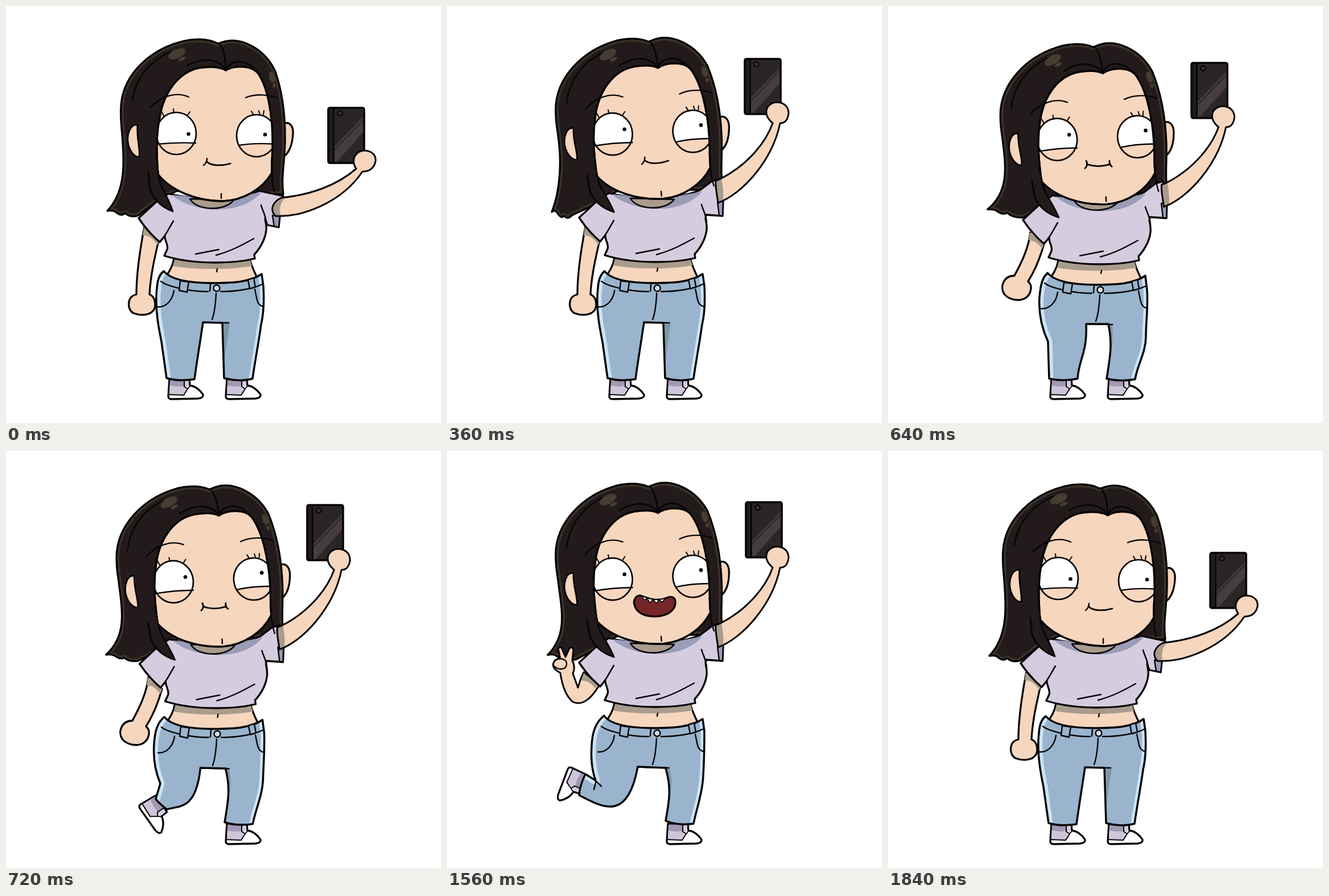
Animation, 764 px wide and 733 px high, one loop 2.4 s. Source, as an HTML page:

```html
<!DOCTYPE html>
<html lang="en">
<head>
<meta charset="utf-8">
<title>Selfie</title>
<style>
  html, body { margin: 0; width: 100%; height: 100%; overflow: hidden; background: #fff; }
  svg { display: block; width: 100%; height: 100%; }
</style>
</head>
<body>
<svg id="stage" viewBox="0 0 764 733" stroke-linecap="round" stroke-linejoin="round"></svg>
<script>
const LOOP = 2400;
const INK = '#060405', SKIN = '#f7d6be', SHADE = '#a99c8c', HAIR = '#221a1b', RIM = '#3a3328', GLOSS = '#453d31';
const SHIRT = '#d5cddf', SHIRT_DARK = '#9a9cb8', JEANS = '#9ab4cd', JEANS_LIGHT = '#cbe3f5', JEANS_DARK = '#7c99a8';

// ---- poses ----
const down = {
  head: [0, 0, 0], gaze: 0, torso: [0, 0], waist: [0, 0], mouth: 'smile', peace: false,
  tail: 'C208,270 212,325 178,360 Q190,358 195,364 Q203,370 209,364 Q219,373 233,368',
  armPos: [0, 0], phone: [0, 0],
  arm: 'M484,337 C535,332 582,315 615,286 C604,268 616,254 630,254 C645,255 650,264 649,273 C646,287 637,291 626,291 C590,345 520,372 473,369 C463,358 468,344 484,337',
  cuff: 'M473,369 C463,358 468,344 484,337 L491,336 C481,345 479,360 483,369',
  sleeve: 'L459,385 L479,389 L481,370 L487,334 L468,330',
  sleeveShade: 'M468,368 L471,387 L479,389 L481,368Z',
  left: 'M243,388 C235,430 229,470 229,507 C212,510 212,534 224,540 C240,546 262,543 262,525 C262,512 255,508 252,507 C254,470 262,440 268,412',
  leftShade: 'M242,389 L268,414 L266,420 C258,408 250,403 240,403',
  legs: [
    'M277,466 C266,474 265,490 264,510 C263,540 268,565 273,590 L282,654',
    'C298,659 318,658 331,656 C336,620 341,590 346,556 L380,557 C381,590 382,620 383,654 C400,659 420,659 433,655',
    'M433,655 C438,620 444,590 448,560 C453,540 453,510 452,492 L449,471'],
  inner: 'M380,557 L393,557 C390,580 387,600 383,625',
  shoe: [305, 657, 0]
};
const up = {
  ...down, head: [-1.5, -4, -3.6], gaze: -8, torso: [-1, -1], waist: [-.7, 0],
  tail: 'C208,270 200,320 184,354 Q190,349 194,357 Q200,368 205,362 Q211,370 219,362',
  phone: [-43, -86],
  arm: 'M480,304 C522,283 558,245 572,206 C553,190 560,170 580,169 C595,170 600,180 600,189 C598,202 593,206 585,206 C572,270 520,330 476,346 C474,330 471,318 472,307',
  cuff: 'M476,346 C474,330 471,318 472,307 L482,303 C485,318 486,332 485,341',
  sleeve: 'L456,368 L485,370 L486,346 L479,305 L466,309',
  sleeveShade: 'M476,344 L479,369 L485,370 L486,341Z'
};
const crouch = {
  ...up, head: [5, 5.5, -3.6], torso: [4, 3], waist: [3, 3], mouth: 'flat',
  tail: 'C206,265 210,310 169,339 Q182,339 188,345 Q196,351 203,347 Q212,357 230,357',
  armPos: [8.5, 7], phone: [-33, -79],
  left: 'M250,398 C247,425 235,450 222,474 C203,474 196,494 204,506 C214,520 244,522 250,502 C253,492 250,488 246,484 C258,465 268,440 274,418',
  leftShade: 'M249,398 L274,418 L271,427 C263,416 256,412 247,412',
  legs: [
    'M280,470 C271,477 268,490 266,512 C264,542 271,568 281,590 L283,655',
    'C300,659 320,658 333,655 C335,620 350,612 348,559 L387,559 C394,592 391,612 384,655 C400,659 420,659 434,656',
    'M434,656 C438,630 453,610 453,580 C453,555 457,530 455,500 L452,474'],
  inner: 'M386,559 L393,560 C397,580 393,602 389,622'
};
const overshoot = {
  ...up, waist: [-1, 0], mouth: 'open', peace: true,
  tail: 'C206,270 216,315 177,350 Q188,348 194,354 Q200,358 206,357 Q214,363 226,361',
  armPos: [0, -1], phone: [-41, -89], left: crouch.left, leftShade: crouch.leftShade,
  legs: [
    'M276,465 C261,477 255,494 254,519 C252,547 256,565 261,579 L243,568',
    'C237,580 233,592 232,605 C273,626 317,653 335,555 L384,557 C394,592 391,612 384,650 C400,657 420,657 433,655',
    'M433,655 C438,630 449,600 450,570 C452,540 452,510 452,492 L449,471'],
  inner: 'M384,557 L391,557 C397,580 394,600 389,622',
  shoe: [238, 586, 112]
};
const cheer = {
  ...overshoot, head: [.5, -2, -3.6], torso: [0, 0], waist: [0, 0], armPos: [3, 1], phone: [-38, -87],
  legs: [
    'M277,466 C264,478 258,495 257,520 C255,548 258,566 263,581 L246,570',
    'C240,582 236,594 235,607 C275,628 320,655 338,555 L384,557 C394,592 391,612 384,650 C400,657 420,657 433,655',
    overshoot.legs[2]],
  shoe: [241, 588, 112]
};

const NUM = /-?\d+(\.\d+)?/g;
function mix(a, b, t) {
  if (typeof a === 'number') return a + (b - a) * t;
  if (typeof a === 'string') {
    const other = b.match(NUM) || [];
    let i = 0;
    return a.replace(NUM, n => mix(+n, +other[i++], t).toFixed(1));
  }
  if (Array.isArray(a)) return a.map((v, i) => mix(v, b[i], t));
  if (typeof a === 'object') return Object.fromEntries(Object.keys(a).map(k => [k, mix(a[k], b[k], t)]));
  return a;
}

const timeline = [
  [0, down],
  [240, { ...mix(down, crouch, .5), legs: crouch.legs, inner: crouch.inner, tail: crouch.tail }],
  [320, mix(down, up, .7)],
  [360, up],
  [440, { ...up, head: cheer.head, torso: [0, 0], waist: [0, 0], armPos: cheer.armPos, phone: cheer.phone }],
  [640, crouch],
  [720, mix(crouch, overshoot, .5)],
  [800, overshoot],
  [880, cheer],
  [1560, overshoot],
  [1640, mix(crouch, overshoot, .5)],
  [1680, crouch],
  [1760, { ...down, head: [2, 3, 0], torso: [1, 1], armPos: [5, 3], phone: [5, 4] }],
  [1840, down]
];

// ---- drawing helpers ----
const shape = (d, fill, w = 3.3) => `<path d="${d}" fill="${fill}" stroke="${INK}" stroke-width="${w}"/>`;
const flat = (d, fill) => `<path d="${d}" fill="${fill}"/>`;
const line = (d, w = 2.4, color = INK) => `<path d="${d}" fill="none" stroke="${color}" stroke-width="${w}"/>`;
const oval = (x, y, rx, ry, fill, w = 0, turn = 0) =>
  `<ellipse cx="${x}" cy="${y}" rx="${rx}" ry="${ry}" fill="${fill}" stroke="${INK}" stroke-width="${w}" transform="rotate(${turn} ${x} ${y})"/>`;
const group = (transform, ...parts) => `<g transform="${transform}">${parts.join('')}</g>`;
const at = (p, ...parts) => group(`translate(${p[0]} ${p[1]})`, ...parts);
const clip = (id, d, ...parts) =>
  `<clipPath id="${id}"><path d="${d}"/></clipPath><g clip-path="url(#${id})">${parts.join('')}</g>`;

const FACE = 'M386,113 C400,104 432,103 444,120 C460,145 468,190 468,240 C468,262 466,280 467,293 C450,323 415,342 380,343 C335,343 290,325 267,296 C265,270 262,230 272,185 C282,145 308,112 345,108 C365,106 378,108 386,113Z';

function hairBack(p) {
  const d = `M203,215 ${p.tail} L262,345 L300,325 L440,331 L487,331 C483,300 489,280 490,240 C491,190 485,150 473,115 C455,76 415,55 385,62 L372,66 C355,57 330,57 310,62 C257,75 206,117 202,175 C201,190 202,205 203,215Z`;
  return shape('M489,206 C500,203 505,214 504,225 C503,244 497,259 487,265Z', SKIN) +
    flat(d, HAIR) +
    clip('hair', d, line(d, 10, RIM)) +
    oval(300, 84, 16, 8, GLOSS, 0, -25) + oval(309, 93, 7, 3, GLOSS, 0, -25) +
    oval(467, 125, 5, 10, GLOSS, 0, -15) + oval(471, 140, 3, 4, GLOSS) +
    line('M222,165 C228,125 255,95 290,80') + line(d, 3.3);
}

const mouths = {
  smile: line('M353,268 C353,274 351,277 347,280') + line('M352,273 C360,282 380,281 394,277', 2.8),
  flat: group('rotate(3.6 368 273)',
    line('M347,266 C350,271 349,275 345,279', 2.8) + line('M348,272 Q368,279 389,272', 2.8) + line('M388,266 Q387,272 392,276', 2.8)),
  open: at([3.3, 1.4], group('rotate(3.6 367 274)',
    shape('M342,256 C332,256 329,266 331,272 C334,286 348,293 368,293 C390,292 402,282 403,270 C404,260 397,256 388,260 C372,267 356,262 342,256Z', '#762629'),
    shape('M344,257 L348,264 L354,261 L358,269 L364,263 L370,270 L374,263 L380,268 L385,261 C372,266 356,262 344,257Z', '#fff', 1.6)))
};

function face(p) {
  const eyes = oval(299, 224, 35, 37, '#fff') + oval(440, 228, 35, 37, '#fff') +
    flat('M264,243 Q300,239 334,241 C328,255 315,261 299,261 C284,261 270,254 264,243Z', SKIN) +
    flat('M409,245 Q438,240 474,243 V266 H440 C425,265 414,257 409,245Z', SKIN) +
    line('M264,243 Q300,239 333,241') + line('M409,245 Q438,240 474,243') +
    oval(299, 224, 35, 37, 'none', 2.7) + oval(440, 228, 35, 37, 'none', 2.7);
  return shape(FACE, SKIN) +
    clip('face', FACE, eyes) + line(FACE, 3.2) +
    at([0, p.gaze], oval(320.5, 225, 3.3, 3.3, INK), oval(455, 226, 3.3, 3.3, INK)) +
    line('M273,185 L277,193 M294,181 L295,188 M323,186 L318,193 M431,185 L435,192 M444,184 L446,191 M453,184 L452,191', 2) +
    line('M254,178 C272,158 300,150 321,160 M421,161 C438,154 463,155 478,163') +
    line('M378,330 V338') + mouths[p.mouth] +
    line('M375,66 C384,78 385,95 386,112 C368,86 335,95 318,105 M386,111 C398,92 424,94 440,115', 2.6) +
    line('M467,293 Q467,312 471,326') +
    shape('M231,209 C218,207 213,225 214,238 C216,255 226,266 234,265 C236,250 229,235 231,209Z', SKIN, 2.7) +
    flat('M267,285 C268,318 283,330 293,361 C275,354 258,342 249,312 L248,285Z', HAIR) +
    line('M267,290 C268,318 283,330 293,361 C275,354 260,343 253,322 L250,293', 2.8);
}

const SHOE =
  shape('M287,655 L285,686 Q285,691 291,691 L337,690 Q347,689 346,683 C341,675 332,668 323,667 L322,655Z', '#fff') +
  flat('M288,657 L287,682 L312,683 L317,674 L313,670 V657Z', '#cfc5da') +
  flat('M288,657 H313 V668 Q300,670 288,667Z', '#a198b3') +
  flat('M314,657 H321 V667 L317,671 L314,668Z', '#d3ccdc') +
  line('M286,683 L312,684 L319,673 L313,669 V657 M319,673 L323,668', 2);
const shoe = ([x, y, turn]) => group(`translate(${x} ${y}) rotate(${turn}) translate(-305 -657)`, SHOE);

function jeans(p) {
  const [outer, mid, right] = p.legs, [wx, wy] = p.waist;
  const top = `C${430 + wx},${485 + wy} ${400 + wx},${487 + wy} ${362 + wx},${487 + wy} C${325 + wx},${487 + wy} ${290 + wx},${482 + wy} ${277 + wx},${466 + wy}Z`;
  const d = `${outer} ${mid} ${right.replace('M', 'L')} ${top}`;
  const fold = p.shoe[2] > 100 ? at([p.shoe[0] - 241, p.shoe[1] - 588], line('M263,581 L274,591 M264,585 L261,597', 2.6)) : '';
  return flat(d, JEANS) +
    clip('jeans', d, line(outer, 15, JEANS_LIGHT), line(right, 13, JEANS_LIGHT), flat(p.inner, JEANS_DARK)) +
    line(d, 3.5) + fold +
    at(p.waist,
      line('M272,484 C285,494 325,502 355,502 M377,502 C405,502 435,497 450,489'),
      shape('M306,483 L321,485 L318,503 L304,500Z M425,481 L435,478 L438,494 L428,497Z', JEANS, 2.4),
      line('M359,488 L358,501'),
      oval(370, 496, 5.5, 5.5, '#d3dcea', 2.4),
      line('M369,505 C368,525 366,540 362,551 M346,556 L391,557'),
      line('M295,500 C293,515 283,530 266,529 M437,498 C441,515 440,525 451,528'));
}

const PEACE =
  shape('M241,390 C236,400 233,409 231,417 L222,392 C226,384 224,375 221,369 L223,351 C222,345 217,345 215,350 L209,363 L203,349 C201,344 195,346 197,352 L200,366 C190,366 186,374 188,380 C190,386 195,388 200,391 C203,412 210,432 222,442 C238,450 255,436 268,413Z', SKIN, 3) +
  flat('M241,391 L265,412 L261,418 C254,409 247,405 237,404Z', SHADE) +
  line('M189,379 C196,386 210,387 211,376 C212,368 204,366 199,366');
const leftArm = p => p.peace ? at(p.torso, PEACE) : shape(p.left, SKIN) + flat(p.leftShade, SHADE);

const BELLY = 'M295,444 C293,458 286,468 279,478 C300,495 420,495 442,480 C437,468 431,458 428,444Z';
const belly = p => at(p.torso, shape(BELLY, SKIN),
  flat('M296,446 L293,457 C330,464 395,464 432,457 L428,444Z', SHADE), line('M371,462 L370,467'));

const shirt = p => at(p.torso,
  shape(`M285,330 L262,346 L233,373 C243,388 256,403 270,415 L279,404 C278,412 286,420 283,428 L278,439 C325,454 395,454 437,444 L436,437 C450,422 456,405 457,394 C458,387 456,380 455,374 ${p.sleeve} L445,325 Q380,350 285,330Z`, SHIRT),
  shape(p.sleeveShade, SHIRT_DARK, 2.4),
  flat('M291,332 C330,366 416,368 449,327 L380,340Z', SHIRT_DARK),
  shape('M323,339 C335,361 386,361 400,341Z', SHADE, 2.6),
  line('M294,378 C286,391 280,405 270,415 M448,350 C451,362 456,366 457,382', 2.6),
  line('M333,436 L374,428 M369,438 C395,431 415,420 435,409'));

const PHONE =
  '<rect x="566" y="179" width="63" height="97" rx="3" fill="#2b2526"/>' +
  flat('M577,247 L628,194 V198 L577,251Z M577,254 L628,201 V221 L581,274 H577Z', '#453d3f') +
  '<rect x="566" y="179" width="10" height="97" fill="#211b1d"/>' + line('M575.5,179 V276') +
  '<rect x="566" y="179" width="63" height="97" rx="3" fill="none" stroke="' + INK + '" stroke-width="3.6"/>' +
  oval(586.5, 188.5, 4.3, 4.3, '#37302f', 2.2);

function draw(p) {
  const [hx, hy, turn] = p.head;
  const pose = `translate(${hx} ${hy}) rotate(${turn} 377 335)`;
  return group(pose, hairBack(p)) +
    shoe(p.shoe) + at([101, 0], SHOE) +
    belly(p) + jeans(p) + leftArm(p) + shirt(p) +
    at(p.phone, PHONE) +
    at(p.armPos, flat(p.arm, SKIN), flat(p.cuff, SHADE), line(p.arm + 'Z', 3)) +
    group(pose, face(p));
}

const stage = document.getElementById('stage');
const start = performance.now();
let shown = null;
function tick() {
  const t = (performance.now() - start) % LOOP;
  const pose = timeline.filter(step => step[0] <= t).pop()[1];
  if (pose !== shown) stage.innerHTML = draw(shown = pose);
  requestAnimationFrame(tick);
}
tick();
</script>
</body>
</html>
```
